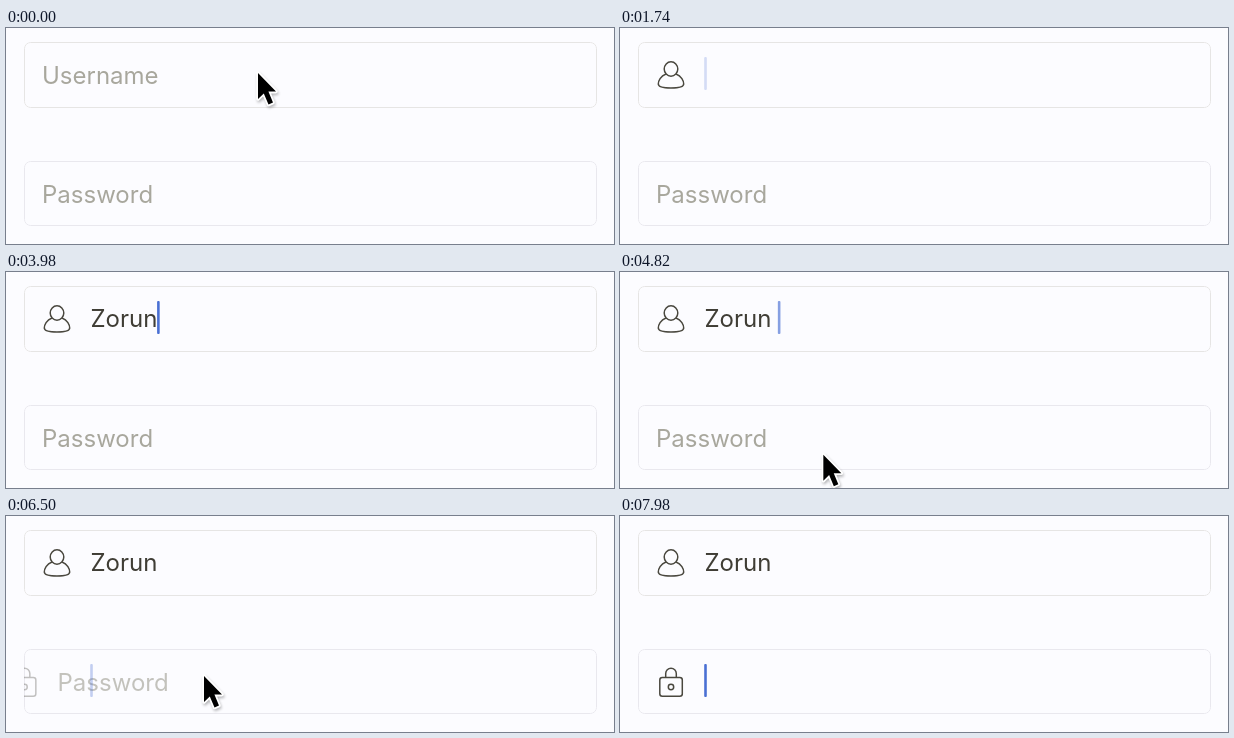
Recreate the animation shown at these times as an HTML page. Size 608x216 px, loop 8 s.

```html
<!DOCTYPE html>
<html lang="en">
<head>
<meta charset="utf-8">
<title>Sign-in fields</title>
<style>
  html, body { margin: 0; width: 100%; height: 100%; overflow: hidden; background: #fcfcff; }
  svg { display: block; width: 608px; height: 216px; }
  text { font: 24px Inter, "Open Sans", sans-serif; white-space: pre; }
  .frame { fill: none; stroke: #e9e8ee; }
  #user .frame { stroke: #e6e5e4; }
  .hint { fill: #a8a79d; }
  .value { fill: #3f3d35; }
  .caret { fill: #4a70d4; }
  .icon { fill: none; stroke: #4a483f; stroke-width: 1.5; stroke-linejoin: round; }
</style>
</head>
<body>
<svg viewBox="0 0 608 216">
  <defs>
    <clipPath id="inside">
      <rect x="18" y="14" width="573" height="66" rx="6"/>
      <rect x="18" y="133" width="573" height="65" rx="6"/>
    </clipPath>
    <path id="arrow" d="M0 0V26L5.8 20.4 10.5 31.5 15 29.5 10.4 18.6H18Z"/>
    <filter id="soft" x="-50%" y="-50%" width="200%" height="200%">
      <feGaussianBlur stdDeviation="1.5"/>
    </filter>
  </defs>

  <g id="user" clip-path="url(#inside)">
    <rect class="frame" x="18.5" y="14.5" width="572" height="65" rx="6"/>
    <text class="hint" y="56">Username</text>
    <g class="icon">
      <ellipse cx="51" cy="41" rx="6.8" ry="7.2"/>
      <path d="M46 46C40.5 48 38.3 53 38.3 56C38.3 59 44 60 51 60S63.7 59 63.7 56C63.7 53 61.5 48 56 46"/>
    </g>
    <text class="value" x="84.5" y="55"></text>
    <rect class="caret" y="29" width="2.6" height="33" rx="1"/>
  </g>

  <g id="pass" clip-path="url(#inside)">
    <rect class="frame" x="18.5" y="133.5" width="572" height="64" rx="6"/>
    <text class="hint" y="175">Password</text>
    <g class="icon">
      <rect x="39.8" y="161.5" width="22.5" height="18.7" rx="2.5"/>
      <path d="M45.7 161.5V157.5a5.3 5.3 0 0 1 10.6 0V161.5"/>
      <circle cx="51" cy="171" r="2.7"/>
    </g>
    <text class="value" x="84.5" y="174"></text>
    <rect class="caret" y="148" width="2.6" height="33" rx="1"/>
  </g>

  <g id="pointer" stroke-linejoin="round">
    <use href="#arrow" x="1" y="2" stroke="#000" stroke-width="3" opacity=".3" filter="url(#soft)"/>
    <use href="#arrow" stroke="#fff" stroke-width="3.6"/>
    <use href="#arrow"/>
  </g>
</svg>

<script>
const LOOP = 8000, SLIDE = 240, SHIFT = 48, BLINK = 1200;
const USER_FOCUS = 680, PASS_FOCUS = 6450;
const NAME = "Zorun ";
const KEY_TIMES = [3320, 3460, 3600, 3740, 3880, 4160];

// Pointer stops: time, x, y
const STOPS = [
  [0, 252, 45], [550, 264, 41], [1050, 264, 41], [1700, 300, 224],
  [4550, 200, 224], [5250, 210, 100], [5600, 210, 100],
  [6250, 198, 160], [6650, 198, 160], [7200, 215, 224]
];

const clamp = v => Math.min(1, Math.max(0, v));
const smooth = u => u * u * (3 - 2 * u);

// CSS "ease": cubic-bezier(.25, .1, .25, 1)
function ease(x) {
  const bezier = (a, b, s) => 3 * a * s * (1 - s) ** 2 + 3 * b * s * s * (1 - s) + s ** 3;
  let lo = 0, hi = 1;
  for (let i = 0; i < 20; i++) {
    const mid = (lo + hi) / 2;
    if (bezier(.25, .25, mid) < x) lo = mid; else hi = mid;
  }
  return bezier(.1, 1, lo);
}

// Solid for half a period, then a quick fade out and back in
function blink(elapsed) {
  const phase = elapsed / BLINK % 1;
  return phase < .75 ? clamp((.65 - phase) / .15) : clamp((phase - .85) / .15);
}

function makeField(id) {
  const part = name => document.querySelector(`#${id} .${name}`);
  const hint = part("hint"), icon = part("icon"), value = part("value"), caret = part("caret");
  return (t, focusAt, blurAt, text, lastKey) => {
    const p = ease(clamp((t - focusAt) / SLIDE));
    hint.setAttribute("x", 36 + SHIFT * p);
    hint.setAttribute("opacity", 1 - p);
    icon.setAttribute("transform", `translate(${SHIFT * (p - 1)})`);
    icon.setAttribute("opacity", p);
    value.textContent = text;
    caret.setAttribute("x", 84.2 + (text ? value.getComputedTextLength() : 0));
    const focused = t >= focusAt && t < blurAt;
    caret.setAttribute("opacity", focused ? p * blink(t - lastKey) : 0);
  };
}

const drawUser = makeField("user"), drawPass = makeField("pass");
const pointer = document.getElementById("pointer");

function drawPointer(t) {
  const next = STOPS.findIndex(stop => stop[0] > t);
  const to = STOPS.at(next), from = next < 0 ? to : STOPS[next - 1];
  const u = smooth(clamp((t - from[0]) / (to[0] - from[0] || 1)));
  const at = i => from[i] + (to[i] - from[i]) * u;
  pointer.setAttribute("transform", `translate(${at(1)} ${at(2)})`);
}

const start = performance.now();

function draw(now) {
  const t = Math.max(0, now - start) % LOOP;
  const typed = KEY_TIMES.filter(key => key <= t);
  drawUser(t, USER_FOCUS, PASS_FOCUS, NAME.slice(0, typed.length), typed.at(-1) ?? USER_FOCUS);
  drawPass(t, PASS_FOCUS, LOOP, "", PASS_FOCUS);
  drawPointer(t);
  requestAnimationFrame(draw);
}

draw(start);
</script>
</body>
</html>
```
